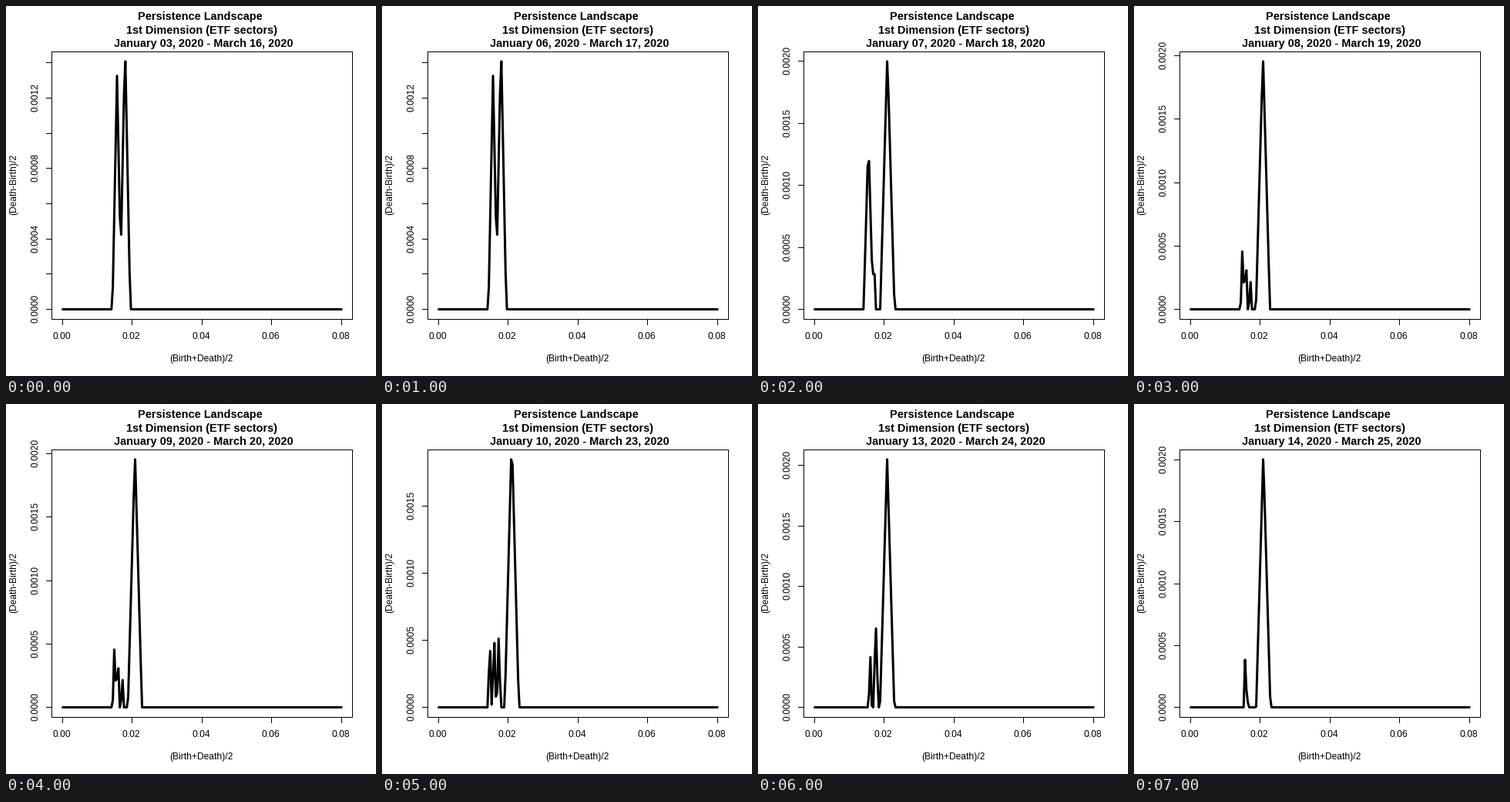
A matplotlib script that plays this animation: 480 by 480 pixels, repeating every 8000 ms.

```python
import numpy as np
import matplotlib.pyplot as plt
from matplotlib.animation import FuncAnimation

plt.rcParams["font.family"] = "Liberation Sans"

SIZE, DPI = 480, 100
LEFT, RIGHT, TOP, BOTTOM = 59, 449, 59, 406    # plot box, pixels
X0, X_SPAN = 73.5, 361.7                       # data 0 and 0.08
Y0, Y_SPAN = 393.5, 321.7                      # data 0 and the peak
X_MAX, N = 0.08, 201
CELL = X_MAX / (N - 1)

# Each landscape is the upper envelope of unit-slope tents:
# (centre, height), both counted in grid cells.
TWIN = [(39, 3.315), (44.73, 3.79)]
RIDGE = [(38.55, 3.44), (42.5, 1.21), (52.15, 5.15)]
RUBBLE = [(37, 1.14), (38.5, 1.03), (39.6, 1.17), (42.7, 0.84), (51.85, 5.042)]
TRIPLE = [(36.7, 1.35), (39.8, 1.4), (43.1, 1.38), (52.45, 5.068)]
DOUBLE = [(39.88, 1.16), (43.85, 1.78), (52, 5.13)]
SINGLE = [(39.2, 1.16), (41, 0.1), (52.1, 5.115)]

# January day, March day, tents
STATES = [
    (3, 16, TWIN), (6, 17, TWIN), (7, 18, RIDGE), (8, 19, RUBBLE),
    (9, 20, RUBBLE), (10, 23, TRIPLE), (13, 24, DOUBLE), (14, 25, SINGLE),
]

fig = plt.figure(figsize=(SIZE / DPI, SIZE / DPI), dpi=DPI, facecolor="white")
ax = fig.add_axes([0, 0, 1, 1])


def pt(px):
    return px * 72 / DPI


def rule(xs, ys):
    """One-pixel line snapped to whole pixels."""
    ax.plot(xs, ys, color="black", lw=pt(1), snap=True,
            solid_capstyle="projecting", solid_joinstyle="miter")


def label(x, y, text, size=12, **kw):
    ax.text(x, y, text, fontsize=pt(size), color="black", ha="center",
            va="baseline", rotation_mode="anchor", **kw)


def landscape(tents):
    k = np.arange(N)
    rows = [h - np.abs(k - c) for c, h in tents]
    return np.maximum(np.max(rows, axis=0), 0) * CELL


def draw_box():
    rule([LEFT, RIGHT, RIGHT, LEFT, LEFT], [TOP, TOP, BOTTOM, BOTTOM, TOP])
    label(253, 461, "(Birth+Death)/2")
    label(13, 231, "(Death-Birth)/2", rotation=90)
    for i in range(5):
        x = int(X0 + X_SPAN * i / 4)
        rule([x, x], [BOTTOM, BOTTOM + 7])
        label(x - 0.5, 432, f"{0.02 * i:.2f}")


def draw_y_axis(peak):
    step, stride = (0.0002, 2) if peak < 0.0015 else (0.0005, 1)
    for i in range(int(peak * 1.04 / step) + 1):
        y = int(Y0 - Y_SPAN * i * step / peak)
        rule([LEFT - 7, LEFT], [y, y])
        if i % stride == 0:
            label(42, y - 1, f"{i * step:.4f}", rotation=90)


def update(i):
    jan, mar, tents = STATES[i]
    ax.clear()
    ax.set(xlim=(0, SIZE), ylim=(SIZE, 0))
    ax.axis("off")

    title = dict(size=14.5, weight="bold")
    label(252, 18, "Persistence Landscape", **title)
    label(254, 36, "1st Dimension (ETF sectors)", **title)
    label(256, 53, f"January {jan:02d}, 2020 - March {mar:02d}, 2020", **title)

    values = landscape(tents)
    draw_box()
    draw_y_axis(values.max())
    ax.plot(X0 + X_SPAN * np.linspace(0, 1, N),
            Y0 - Y_SPAN * values / values.max(), color="black", lw=pt(3),
            solid_capstyle="round", solid_joinstyle="round")
    return []


anim = FuncAnimation(fig, update, frames=len(STATES), interval=1000,
                     init_func=lambda: update(0), repeat=True, repeat_delay=0)
plt.show()
```
